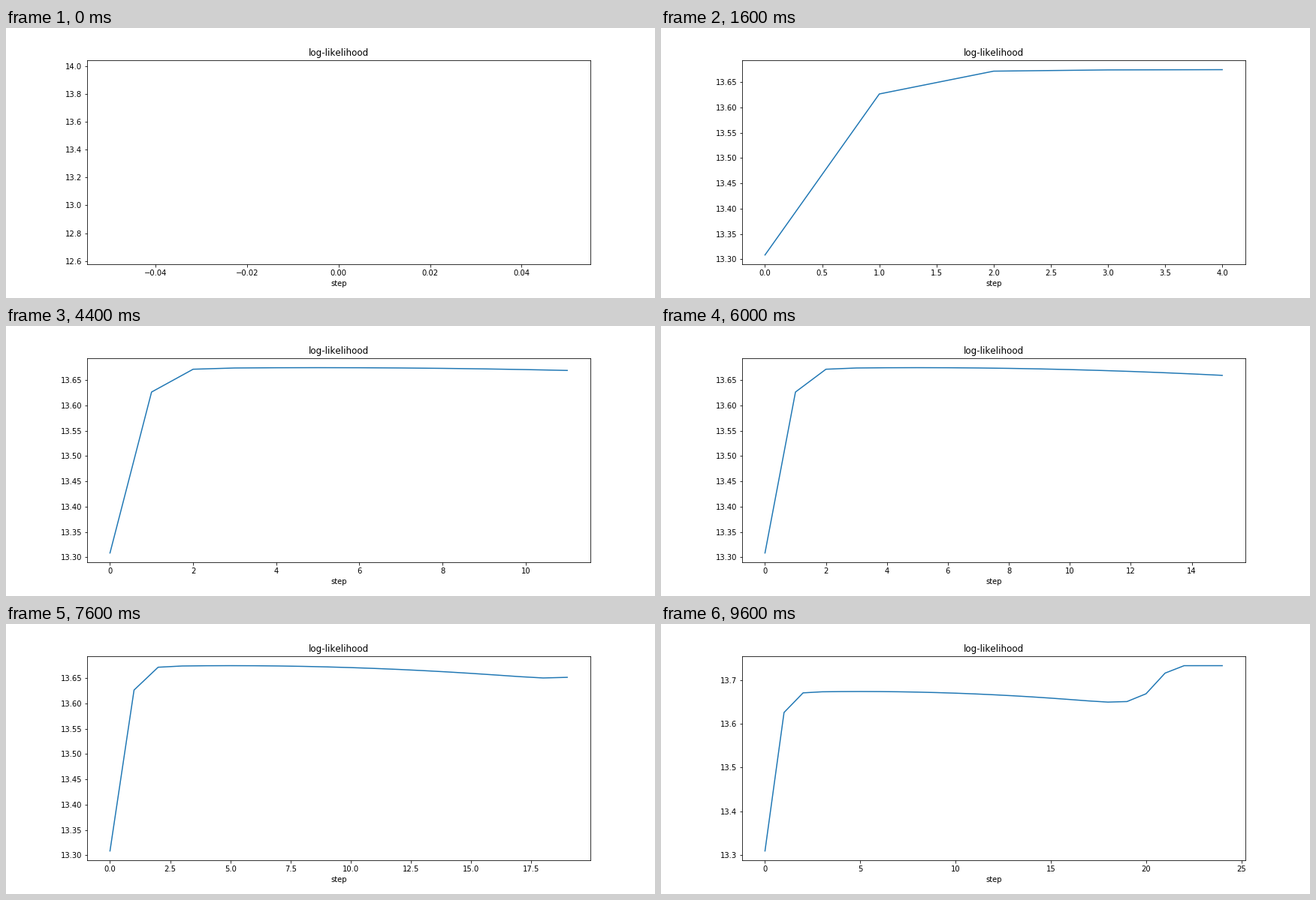
A matplotlib script for the animation above (10 s loop, 864 px wide and 360 px high).

```python
import numpy as np
import matplotlib.pyplot as plt
from matplotlib.animation import FuncAnimation

STEPS = 25
STEP_MS = 400

# Kerning rounded to whole pixels, as in the classic text layout
plt.rcParams["text.kerning_factor"] = 6


def log_likelihood(k):
    """Steep climb, slow parabolic sag, then a jump to the final plateau."""
    sag = 13.6744 - 0.000152 * (k - 5) ** 2
    climb = 0.362 * np.exp(-2.07 * k ** 1.37)
    jump = 1 - np.exp(-np.exp(1.55 * (k - 20) - 0.99))
    return (sag - climb) * (1 - jump) + 13.7337 * jump


steps = np.arange(STEPS)
values = log_likelihood(steps)

fig, ax = plt.subplots(figsize=(12, 5), dpi=72)
fig.subplots_adjust(left=0.125, right=0.9, bottom=0.125, top=0.88)


def draw(step):
    """Plot the history up to this step; the axes rescale themselves."""
    ax.clear()
    ax.set_title("log-likelihood")
    ax.set_xlabel("step")
    return ax.plot(steps[:step + 1], values[:step + 1], color="#1f77b4", lw=1.5)


anim = FuncAnimation(fig, draw, frames=STEPS, init_func=lambda: draw(0),
                     interval=STEP_MS, repeat=True, repeat_delay=0)
plt.show()
```
